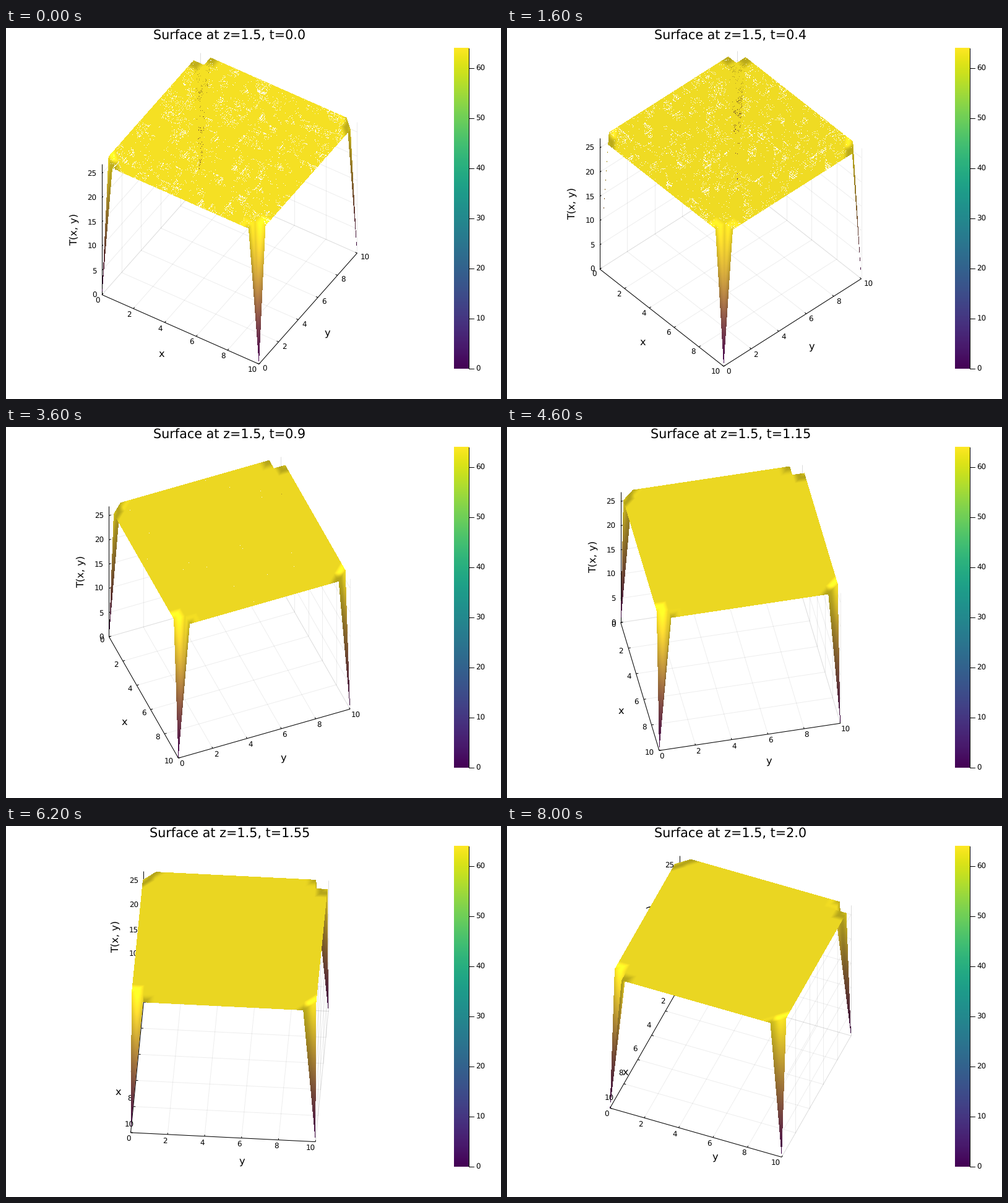
A matplotlib script for the animation above (8200 ms loop, 800 by 600 pixels).

```python
import numpy as np
import matplotlib.pyplot as plt
from matplotlib.animation import FuncAnimation
from matplotlib.collections import LineCollection

W, H = 800, 600
FRAMES, INTERVAL = 41, 200
SIDE, CX, CY = 299.3, 361.25, 397.7   # cube edge and floor centre in pixels
R = np.sqrt(0.5)                      # sine and cosine of the 45 degree elevation
ZMAX, N = 27, 16
LOW, HIGH = np.array([68, 1, 84]), np.array([253, 231, 37])
PX = 0.72                             # points per pixel at 100 dpi

# Flat plate whose four corner nodes are held at zero
line = np.linspace(0, 1, N)
GX, GY = np.meshgrid(line, line, indexing="ij")
GZ = np.ones((N, N))
GZ[::N - 1, ::N - 1] = 0
SX, SY = np.gradient(GZ, line, line)
NORMALS = np.stack([-SX, -SY, np.ones_like(GZ)], -1).reshape(-1, 3)
NORMALS /= np.linalg.norm(NORMALS, axis=1, keepdims=True)
VX, VY, VZ = GX.ravel(), GY.ravel(), GZ.ravel()


def triangles():
    for i in range(N - 1):
        for j in range(N - 1):
            p = i * N + j
            yield [p, p + N, p + 1]
            yield [p + N + 1, p + N, p + 1]


TRIS = list(triangles())


def angle(k):
    return np.radians(32 + 2 * k)


def project(a, x, y, z):
    u, v = x - 0.5, y - 0.5
    return (CX + SIDE * (u * np.cos(a) + v * np.sin(a)),
            CY + SIDE * R * (u * np.sin(a) - v * np.cos(a) - z))


def surface(k):
    """Depth-buffered RGBA picture of the plate."""
    a = angle(k)
    rng = np.random.default_rng(100 + k)
    view = R * np.array([np.sin(a), -np.cos(a), 1])
    px, py = project(a, VX, VY, VZ)
    depth = np.stack([VX, VY, VZ], -1) @ view
    attrs = np.column_stack([depth, NORMALS, VZ])
    buf = np.zeros((H, W, 5))
    buf[..., 0] = -np.inf
    # the plate sits on the clipping plane, so early views lose pixels
    holes = 0.24 / (1 + np.exp(2.2 * (k - 15.5)))

    for tri in TRIS:
        (xa, xb, xc), (ya, yb, yc) = px[tri], py[tri]
        det = (xb - xa) * (yc - ya) - (xc - xa) * (yb - ya)
        if abs(det) < 1e-6:
            continue
        x0, x1 = int(min(xa, xb, xc)), int(max(xa, xb, xc)) + 1
        y0, y1 = int(min(ya, yb, yc)), int(max(ya, yb, yc)) + 1
        dx = np.arange(x0, x1)[None, :] + 0.5 - xa
        dy = np.arange(y0, y1)[:, None] + 0.5 - ya
        w1 = (dx * (yc - ya) - dy * (xc - xa)) / det
        w2 = (dy * (xb - xa) - dx * (yb - ya)) / det
        w0 = 1 - w1 - w2
        inside = (w0 >= -1e-9) & (w1 >= -1e-9) & (w2 >= -1e-9)
        if holes > 1e-4 and VZ[tri].min() == 1:
            band = rng.random(12)[np.clip(w1 * 12, 0, 11).astype(int)]
            chance = holes * rng.random() ** 3 * (0.6 + 2.5 * (band > 0.85))
            inside &= rng.random(inside.shape) >= chance
        vals = np.stack([w0, w1, w2], -1) @ attrs[tri]
        part = buf[y0:y1, x0:x1]
        inside &= vals[..., 0] > part[..., 0]
        part[inside] = vals[inside]

    hit = np.isfinite(buf[..., 0])
    data = buf[hit]
    n = data[:, 1:4]
    facing = n @ view / np.linalg.norm(n, axis=1)
    # both sides of the sheet are lit from the camera
    shade = 0.71 + 0.43 * facing ** 2 + 0.045 * np.exp(-k / 12)
    rgb = (LOW + data[:, 4:] * (HIGH - LOW)) * shade[:, None]
    img = np.zeros((H, W, 4), np.uint8)
    img[hit, :3] = np.clip(rgb, 0, 255)
    img[hit, 3] = 255
    return img


TICKS = np.arange(0, 11, 2)
ZTICKS = np.arange(0, 26, 5)


def segment(a, p, q):
    return [project(a, *p), project(a, *q)]


def grid_lines(a):
    out = []
    for t in TICKS / 10:
        out += [segment(a, (t, 0, 0), (t, 1, 0)),
                segment(a, (t, 1, 0), (t, 1, 1)),
                segment(a, (0, t, 0), (1, t, 0)),
                segment(a, (0, t, 0), (0, t, 1))]
    for t in ZTICKS / ZMAX:
        out += [segment(a, (0, 0, t), (0, 1, t)),
                segment(a, (0, 1, t), (1, 1, t))]
    return out


def axis_lines(a):
    m = 0.012
    out = [segment(a, (0, 0, 0), (1, 0, 0)),
           segment(a, (1, 0, 0), (1, 1, 0)),
           segment(a, (0, 0, 0), (0, 0, 1))]
    for t in TICKS / 10:
        out += [segment(a, (t, 0, 0), (t, m, 0)),
                segment(a, (1, t, 0), (1 - m, t, 0))]
    return out + [segment(a, (0, 0, t), (0, m, t)) for t in ZTICKS / ZMAX]


plt.rcParams["font.family"] = "DejaVu Sans"
plt.rcParams["text.hinting"] = "none"
fig = plt.figure(figsize=(W / 100, H / 100), dpi=100, facecolor="white")
ax = fig.add_axes([0, 0, 1, 1])
ax.axis("off")


def label(s, px, x=0, y=0, **kw):
    kw.setdefault("ha", "center")
    return ax.text(x, y, s, fontsize=px * PX, va="baseline", zorder=3, **kw)


SMALL, MEDIUM, LARGE = 11.85, 16.3, 20.75
CAP = 4.3   # half the height of a small digit

title = label("", LARGE, CX, 18.5)
x_name, y_name = label("x", MEDIUM), label("y", MEDIUM)
z_name = label("T(x, y)", MEDIUM, rotation=90, rotation_mode="anchor")
x_nums = [label(str(t), SMALL) for t in TICKS]
y_nums = [label(str(t), SMALL) for t in TICKS]
z_nums = [label(str(t), SMALL, ha="right") for t in ZTICKS]

grid = LineCollection([], colors=[(0, 0, 0, 0.07)], linewidths=PX, zorder=1)
axes3d = LineCollection([], colors="black", linewidths=PX, zorder=2)
ax.add_collection(grid)
ax.add_collection(axes3d)
plate = ax.imshow(np.zeros((H, W, 4), np.uint8), extent=(0, W, H, 0),
                  interpolation="nearest", aspect="auto", zorder=5)

# Colour bar from 0 to 64
BX, TOP, BOTTOM = 748, 32.5, 550.6
ax.imshow(np.linspace(1, 0, 256)[:, None], cmap="viridis", aspect="auto",
          extent=(724, BX, BOTTOM, TOP), interpolation="nearest", zorder=1)
ax.plot([BX, BX], [TOP, BOTTOM], color="black", lw=PX, zorder=2)
for v in range(0, 61, 10):
    y = BOTTOM - (BOTTOM - TOP) * v / 64
    ax.plot([BX, BX + 8], [y, y], color="black", lw=PX, zorder=2)
    label(str(v), SMALL, 759.2, y + CAP, ha="left")

ax.set_xlim(0, W)
ax.set_ylim(H, 0)


def place_numbers(nums, a, start, end):
    """Set numbers beside an axis, pushed out at a right angle to it."""
    p = np.array(project(a, *start))
    q = np.array(project(a, *end))
    dx, dy = (q - p) / np.hypot(*(q - p))
    nx, ny = -dy, dx
    left = nx * ny > 0
    for num, t in zip(nums, TICKS / 10):
        x, y = p + (q - p) * t
        x += 8.7 * nx - (0.8 if left else -0.3)
        y += 8.45 * ny + 1.27 + CAP - (14 if ny < 0 else 0)
        num.set_position((x, y))
        num.set_ha("left" if left else "right")


def update(k):
    a = angle(k)
    title.set_text(f"Surface at z=1.5, t={round(0.05 * k, 2)}")
    grid.set_segments(grid_lines(a))
    axes3d.set_segments(axis_lines(a))
    place_numbers(x_nums, a, (0, 0, 0), (1, 0, 0))
    place_numbers(y_nums, a, (1, 0, 0), (1, 1, 0))
    for num, t in zip(z_nums, ZTICKS / ZMAX):
        x, y = project(a, 0, 0, t)
        num.set_position((x - 8.3, y + CAP))
    x, y = project(a, 0.5, 0, 0)
    x_name.set_position((x - 31, y + 44.5))
    x, y = project(a, 1, 0.5, 0)
    y_name.set_position((x + 31, y + 44.5))
    x, y = project(a, 0, 0, 0.5)
    z_name.set_position((x - 40.5, y))
    plate.set_data(surface(k))
    return []


anim = FuncAnimation(fig, update, frames=FRAMES, interval=INTERVAL,
                     repeat=True, repeat_delay=0, blit=False)
plt.show()
```
